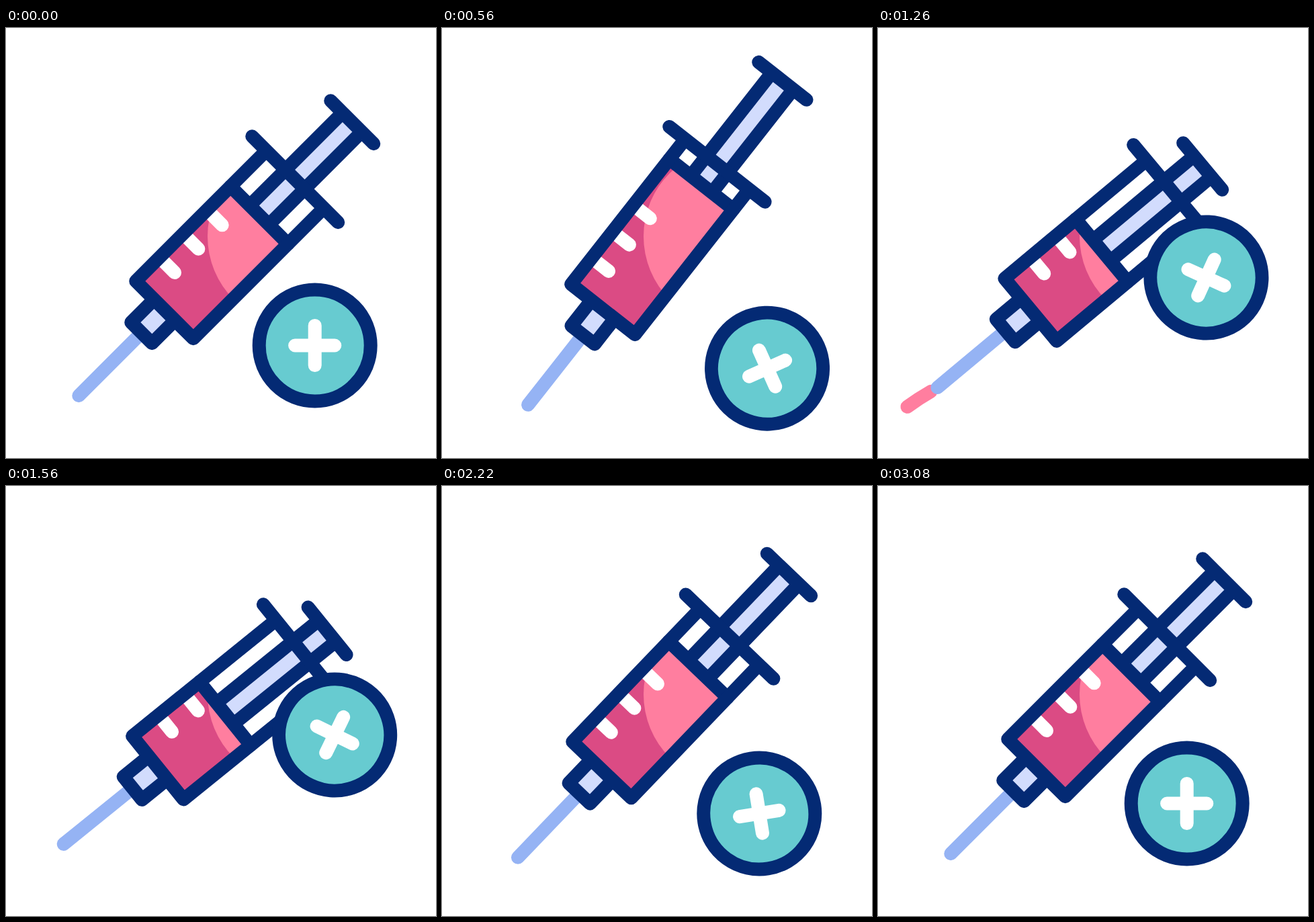
These frames come from a looping animation (640 px wide and 640 px high, 3200 ms). An HTML page:

```html
<!DOCTYPE html>
<html lang="en">
<head>
<meta charset="utf-8">
<title>Syringe</title>
<style>
  html, body { margin: 0; width: 100%; height: 100%; overflow: hidden; background: #fff; }
  svg { display: block; width: 100vw; height: 100vh; }
  .line { fill: none; stroke: #042a74; stroke-width: 20; stroke-linecap: round; stroke-linejoin: round; }
  .white { stroke: #fff; }
  .needle { stroke: #95b3f4; }
  .drop { stroke: #ff7e9f; }
  .lilac { fill: #d2dcfd; }
  .line.teal { fill: #67cbd0; }
  .dark { fill: #db4b84; }
  .light { fill: #ff7e9f; }
</style>
</head>
<body>
<svg viewBox="0 0 640 640">
  <defs>
    <clipPath id="liquid"><rect id="level" x="-60.5" width="121"/></clipPath>
  </defs>

  <path class="line drop" pathLength="1" d="M86 541Q46 572 18 558"/>
  <path class="line drop" pathLength="1" d="M84 538Q44 560 12 590"/>

  <!-- the highlight stays put while the barrel swings around it -->
  <g clip-path="url(#liquid)">
    <rect class="dark" width="640" height="640"/>
    <circle class="light" cx="433" cy="310" r="133"/>
  </g>

  <g id="syringe">
    <path class="line needle" d="M0 48V180.6"/>
    <path class="line white" d="M-60 -49.9H-28.6M-60 -99.8H-28.6M-60 -149.8H-28.6"/>
    <g id="plunger">
      <rect class="lilac" x="-20" y="-395" width="40" height="195"/>
      <path class="line" d="M-20.2 -199.4V-394.9M20.2 -199.4V-394.9M-45.3 -394.9H45.3M-60.5 -199.4H60.5"/>
    </g>
    <rect class="lilac" x="-22" y="0" width="44" height="48"/>
    <path class="line" d="M-22 0V48.4H22V0M-60.5 -274.7V0H60.5V-274.7M-90.5 -274.7H90.5"/>
  </g>

  <g id="badge">
    <circle class="line teal" r="83"/>
    <path class="line white" d="M-29.6 0H29.6M0 -29.6V29.6"/>
  </g>
</svg>

<script>
const LOOP = 3200, START = 120, PUSHED = 960, HELD = 1560, END = 3080;

const $ = id => document.getElementById(id);
const clamp = v => Math.min(1, Math.max(0, v));
const part = (t, a, b) => clamp((t - a) / (b - a));
const smooth = u => u * u * (3 - 2 * u);
const mix = (a, b, u) => a + (b - a) * u;

// Damped spring let go at rest from 1; half is half a period, damp the decay per ms.
function spring(age, half, damp) {
  const w = Math.PI / half;
  return Math.exp(-damp * age) * (Math.cos(w * age) + damp / w * Math.sin(w * age));
}

// Wind back, push forward, creep on to the hold, then spring home.
function swing({ back, push, hold, peak = 500, release, half, damp }) {
  return t => {
    if (t < peak) return back * smooth(part(t, START, peak));
    if (t < PUSHED) return mix(back, push, smooth(part(t, peak, PUSHED)));
    if (t < release) return mix(push, hold, part(t, PUSHED, HELD));
    return hold * spring(t - release, half, damp) * (1 - part(t, release, END) ** 4);
  };
}

const pull = swing({ back: 42, push: -52, hold: -71, release: 1740, half: 360, damp: .0045 });
const tilt = swing({ back: -7.4, push: 4.3, hold: 6.05, release: 1700, half: 380, damp: .0022 });
const shift = swing({ back: -4, push: -3, hold: -3, release: 1700, half: 380, damp: .0022 });
const spin = swing({ back: -26.5, push: 22.8, hold: 26, release: 1720, half: 420, damp: .002 });
const sway = swing({ back: -27, push: 28, hold: 29.5, release: 1700, half: 440, damp: .0015 });
const lift = swing({ back: 35.5, push: -100, hold: -102, peak: 620, release: 1740, half: 440, damp: .0042 });
const sag = t => 4.2 * Math.sin(Math.PI * part(t, 1700, 2400));

const drops = [...document.querySelectorAll('.drop')];

function draw(t) {
  const out = pull(t);
  const pose = `translate(${shift(t)} ${sag(t)}) rotate(${tilt(t)} 234 355)`
    + ' translate(236 419.5) rotate(45)';
  $('syringe').setAttribute('transform', pose);
  $('plunger').setAttribute('transform', `translate(0 ${-out})`);
  $('level').setAttribute('transform', pose);
  $('level').setAttribute('y', -199.4 - out);
  $('level').setAttribute('height', 199.4 + out);
  // the badge swerves to the right whichever way it spins
  $('badge').setAttribute('transform',
    `translate(${459.7 + Math.abs(sway(t))} ${472.5 + lift(t)}) rotate(${spin(t)})`);

  drops.forEach((drop, i) => {
    const age = t - 760 - 420 * i;
    const head = part(age, 0, 150), tail = part(age, 70, 226);
    drop.style.display = head > tail ? '' : 'none';
    drop.setAttribute('stroke-dasharray', `${head - tail} 3`);
    drop.setAttribute('stroke-dashoffset', -tail);
  });
}

const begin = performance.now();
function tick() {
  draw((performance.now() - begin) % LOOP);
  requestAnimationFrame(tick);
}
tick();
</script>
</body>
</html>
```
